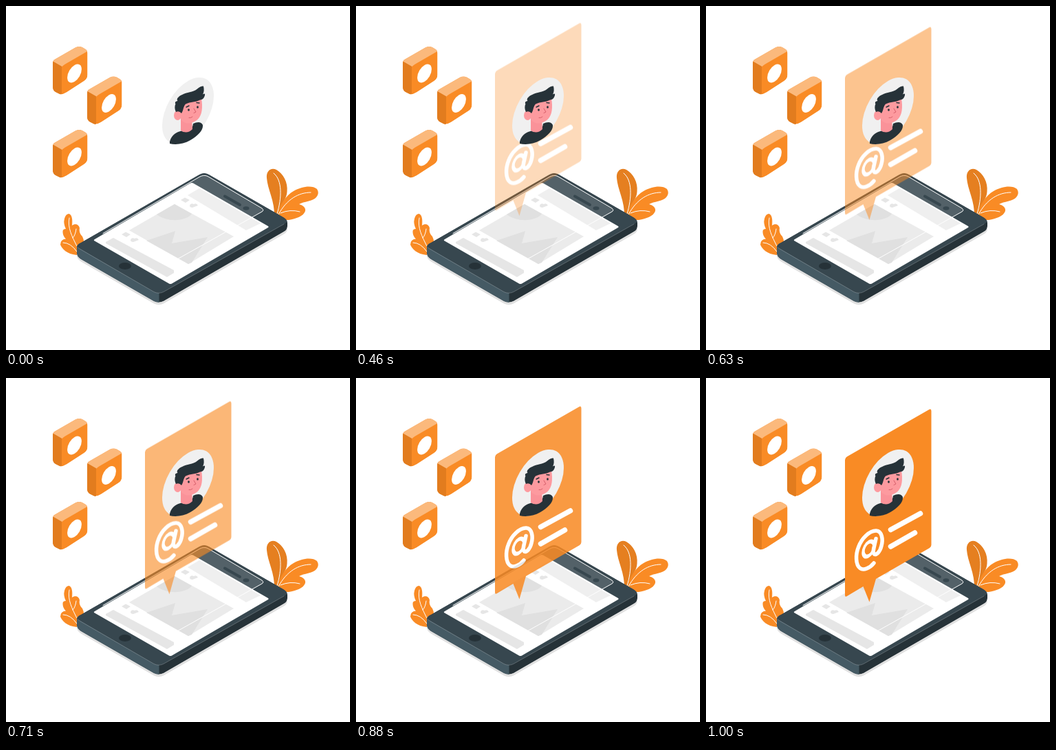
An HTML page for the animation above (1.04 s loop, 500x500 px).

```html
<!DOCTYPE html>
<html lang="en">
<head>
<meta charset="utf-8">
<title>Phone profile card</title>
<style>
  html, body { margin: 0; width: 100%; height: 100%; overflow: hidden; background: #fff; }
  svg { display: block; width: 100vw; height: 100vh; }
  .line { fill: none; stroke: #fff; stroke-linecap: round; stroke-linejoin: round; }
  .orange { fill: #f98b25; }
  .dark { fill: #263238; }
</style>
</head>
<body>
<svg viewBox="0 0 500 500" xmlns="http://www.w3.org/2000/svg">
  <defs>
    <path id="body" d="M103 351Q103 347 108 344.500L281 245Q288 241 295 245L403 307Q409 310.500 409 315V320Q409 325 404 328L229 429Q222 432.500 215 429L109 368Q103 364 103 359Z"/>
    <clipPath id="bodyClip"><use href="#body"/></clipPath>
    <path id="tile" d="M68 83Q68 79.500 71 77.500L101 60.300Q106 57.700 111 60L116 63Q118.500 64.500 118.500 68V100Q118.500 106 113.500 109L88 125.500Q82.500 129 78 128L72 125Q68 122.500 68 118Z"/>
    <clipPath id="tileClip"><use href="#tile"/></clipPath>
    <g id="app">
      <g clip-path="url(#tileClip)">
        <use href="#tile" class="orange"/>
        <path d="M66 76L81 85.500V131H66Z" fill="#e27c1e"/>
        <path d="M66 79L106 55L121 62L118 66L86 84.500Q82.500 86.500 81.500 88Z" fill="#fbb97c"/>
      </g>
      <circle r="12" transform="matrix(.866 -.5 0 1 99.500 98)" fill="#fff"/>
    </g>
    <g id="reaction" fill="#e6e6e6">
      <path d="M254 282L260 278.500L267 282L261 286Z"/>
      <path d="M267 290Q268 286 273 288Q277 286 279 290L271 293Q267 293 267 290Z"/>
    </g>
  </defs>

  <use href="#app"/>
  <use href="#app" x="50" y="43.500"/>
  <use href="#app" y="121"/>

  <!-- plants -->
  <path class="orange" d="M91.500 302C96 303 97 311 96 319C100 316 106 317 107 323C106 328 108 332 111 335Q115 343 111 348L105 362C95 362 83 357 79 347Q79 339 87 338.500Q82 334 82.500 327Q83 324 87 324Q83 316 85 309Q87 302 91.500 302Z"/>
  <g class="line" stroke-width="1">
    <path d="M92 308C89 322 96 335 103 349"/>
    <path d="M83 344Q94 344 103 357"/>
    <path d="M102 324Q101 333 97 337"/>
  </g>
  <path fill="#e57f20" d="M390 306C391 284 380 266 379 250C378 240 385 234 393 238C403 244 410 256 408.500 270C408 280 402 284 400 292L396 306Z"/>
  <path class="orange" d="M393 305C399 288 406 276 418 269C430 262 445 260 452 266Q456 272 451 278C446 284 433 284 426 288Q436 291 435 298C432 306 422 309 411 311L402 311Z"/>
  <g class="line" stroke-width="1">
    <path d="M389 243C402 253 401 279 394 302"/>
    <path d="M396 303C408 281 425 271 443 271"/>
    <path d="M399 301Q413 295 427 299"/>
  </g>

  <!-- phone -->
  <use href="#body" y="3.500" fill="#e0e0e0"/>
  <g clip-path="url(#bodyClip)">
    <use href="#body" class="dark"/>
    <path d="M100 340L222.500 410V436H210L100 372Z" fill="#455a64"/>
    <path d="M103 349Q103 347 108 344.500L281 245Q288 241 295 245L403 306.500Q409 310 409 312.500Q408 315 404 317L229 415.500Q222 419 215 415.500L108 353Q103 351 103 349Z" fill="#37474f"/>
    <path d="M141 330.500L281 248.500Q288 244.500 294 248L372 294Q375 297 372 299L240 373Z" fill="#fff" opacity=".14"/>
  </g>
  <path d="M104 350.500Q105 352 108 353.500L215 415.500Q222 419 229 415.500L404 317" class="line" stroke-width=".5" opacity=".45"/>
  <path d="M128 341Q127 340 129 339L268 257.500Q270 256.500 272 257.500L381 320Q382.500 321 381 322L241 403.500Q239 404.500 237 403.500Z" fill="#fff"/>
  <path d="M264 275L281 265L370 316L349 326Z" fill="#efefef"/>
  <path d="M145 343L156 337L244 384V388L234 394L145 345Z" fill="#e6e6e6"/>
  <path d="M179 326L245 288L331 335L265 375Z" fill="#ebebeb"/>
  <path d="M219 303L245 288L270 302C262 313 235 315 219 303Z" fill="#e0e0e0"/>
  <path d="M204 341L246 327L241 345L293 336L270 373L265 375Z" fill="#e0e0e0"/>
  <use href="#reaction"/>
  <use href="#reaction" x="-86" y="50"/>
  <ellipse cx="173" cy="378" rx="9" ry="5" class="dark"/>
  <path d="M318 276.500L340 289" fill="none" stroke="#37474f" stroke-width="4" stroke-linecap="round"/>
  <ellipse cx="349" cy="294" rx="4.500" ry="2.800" fill="#37474f"/>
  <path class="line" stroke-width="1" d="M141 330.500L281 248.500Q288 244.500 294 248L372 294Q375.500 297 372 299L240 373"/>

  <!-- profile card -->
  <g id="card">
    <path class="orange" d="M202 119Q202 116 205 114.300L324 46Q327.500 44 327.500 48V242.500Q327.500 245.500 325 247L247 292L237.500 325.500L228.500 303L205 317Q202 319 202 315.500Z"/>
    <g class="line">
      <g stroke-width="7.500">
        <path d="M268.500 220.500L311.500 197"/>
        <path d="M268.500 245L303.500 225"/>
      </g>
      <g stroke-width="5.500">
        <path d="M244 269C238 276.500 229 280 224 276.500C217 271.500 217.500 256 221.500 246C226 233 238 221.500 247.500 222C256 222.500 257.500 235 255 244C253 253 246.500 259 244 255.500Q242.500 252.500 244 247L247 233.500"/>
        <ellipse rx="10" ry="10" transform="matrix(.8 -.46 0 1 236.500 248.500)"/>
      </g>
    </g>
  </g>

  <!-- avatar -->
  <circle r="43.300" transform="matrix(.866 -.5 0 1 264.500 152.300)" fill="#f0f0f0"/>
  <path class="dark" d="M238 197C241 186 249 183 255 181.500C264 186 271 180 272 171C278 168 284 168 286 173C287 181 278 189 268 195C258 201 246 202 238 200Z"/>
  <path fill="#fa9299" d="M254 164V181Q263 187 271 179L270 164Z"/>
  <g fill="#fd9a9f">
    <ellipse cx="249.500" cy="159" rx="5.500" ry="7"/>
    <path d="M254 143L283 130C286 142 286 155 281 162C277 168 268 172 261 170C255 168 253 163 253 158Z"/>
  </g>
  <path class="dark" d="M246 142Q245 138.500 249.500 138C247 135 251 131 256 129C262 125 272 126 278 120.500Q283 116 287 116.500C288 121 288 125 286 128.500Q290 126 289 130Q287 136.500 282 136.500C276 140 268 139 261 142.500C257.500 146 258 152 255 156Q252 152 247 154Q244 148 246.500 142Z"/>
  <g class="dark">
    <ellipse cx="265.500" cy="151" rx="1.400" ry="1.800"/>
    <ellipse cx="278.500" cy="147" rx="1.400" ry="1.800"/>
  </g>
  <g fill="none" stroke-linecap="round">
    <path d="M262 147L266 145M277 140.500L281 141" stroke="#263238" stroke-width="1.500"/>
    <path d="M273 149L276 154L273 155.500M266 162.500Q269 163 271 161" stroke="#d8606c" stroke-width="1"/>
  </g>
</svg>
<script>
  const LOOP = 1040, FPS = 24, FIRST = 3, RISE = 1000;
  const rise = document.getElementById("card").animate([
    { opacity: 0, transform: "translateY(-30px)" },
    { opacity: 1, transform: "translateY(0)" }
  ], { duration: RISE, easing: "ease-in", fill: "both" });
  rise.pause();
  rise.currentTime = 0;
  const start = performance.now();

  function draw(now) {
    const t = Math.max(0, now - start) % LOOP;
    // step times round to 10 ms, hence the small lead
    const step = Math.floor((t + 3.5) * FPS / 1000);
    rise.currentTime = step < FIRST ? 0 : Math.min(RISE, (step + 1) * 1000 / FPS);
    requestAnimationFrame(draw);
  }
  requestAnimationFrame(draw);
</script>
</body>
</html>
```
